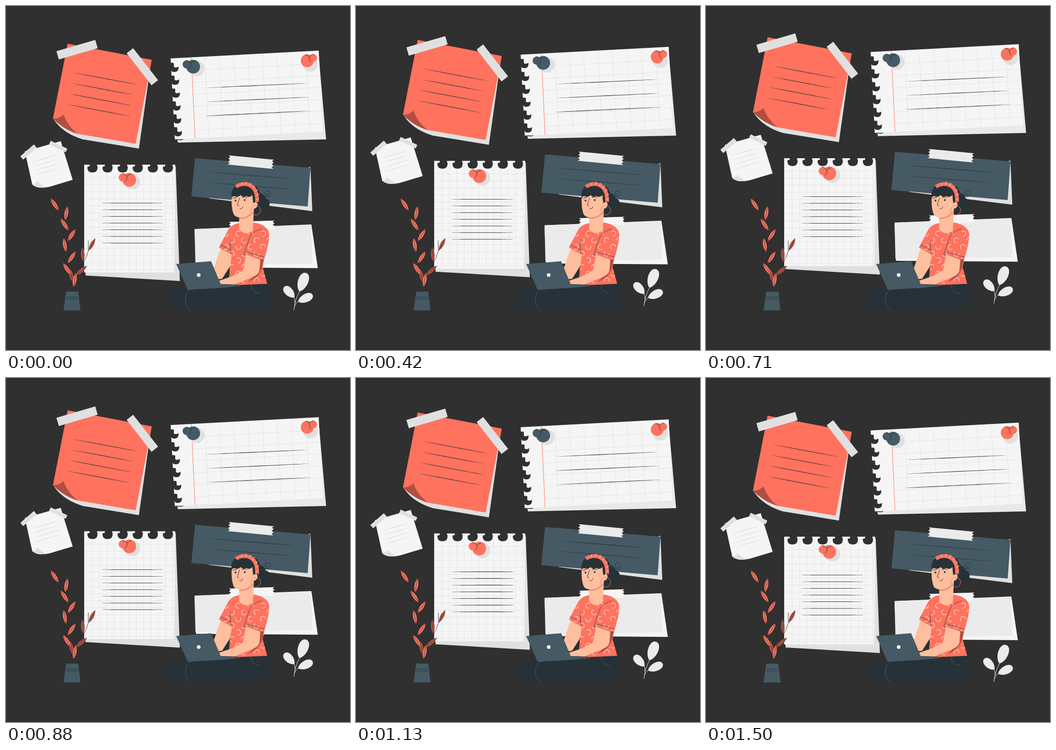
Recreate the animation shown at these times as an HTML page. Size 748 px wide and 748 px high, loop 1.54 s.

```html
<!DOCTYPE html>
<html lang="en">
<head>
<meta charset="utf-8">
<title>Notes</title>
<style>
  html, body { margin: 0; width: 100%; height: 100%; overflow: hidden; background: #303030; }
  svg { display: block; width: 100%; height: 100%; }
</style>
</head>
<body>
<svg id="stage" viewBox="0 0 748 748"></svg>
<script>
const BG = '#303030', CORAL = '#ff725e', RUST = '#b24f41', BLUE = '#455a64', INK = '#263238',
      PAPER = '#f5f5f5', PALE = '#ebebeb', GREY = '#e0e0e0', SKIN = '#ffbe9d';

const fill = (d, color) => `<path d="${d}" fill="${color}"/>`;
const disc = (x, y, r, color) => `<circle cx="${x}" cy="${y}" r="${r}" fill="${color}"/>`;
const ring = (x, y, r, color, extra = '') =>
  `<circle cx="${x}" cy="${y}" r="${r}" fill="none" stroke="${color}" ${extra}/>`;
const stroke = (d, color, width = 1) => `<path d="${d}" fill="none" stroke="${color}" stroke-width="${width}"/>`;
const place = (x, y, angle, content) => `<g transform="translate(${x} ${y}) rotate(${angle})">${content}</g>`;
const repeat = (n, make) => Array.from({ length: n }, (_, i) => make(i)).join('');

// A shape pointed at both ends; its sides bulge by w, fullest between the fractions t and 1 - t
function spindle(x1, y1, x2, y2, w, t, color) {
  const dx = x2 - x1, dy = y2 - y1, len = Math.hypot(dx, dy);
  const at = (f, side) => `${x1 + dx * f - side * w * dy / len} ${y1 + dy * f + side * w * dx / len}`;
  return fill(`M${x1} ${y1}C${at(t, 1)} ${at(1 - t, 1)} ${x2} ${y2}C${at(1 - t, -1)} ${at(t, -1)} ${x1} ${y1}`, color);
}
const rule = (x1, y1, x2, y2, color = INK) => spindle(x1, y1, x2, y2, .75, .08, color);
const leaf = (color, x1, y1, x2, y2) =>
  spindle(x1, y1, x2, y2, 5.4, .35, color) + stroke(`M${x1} ${y1}L${x2} ${y2}`, INK, .8);

const tape = (x, y, w, h, angle, color = GREY) =>
  place(x, y, angle, `<rect x="${-w / 2}" y="${-h / 2}" width="${w}" height="${h}" fill="${color}"/>`);

function tornTape(x, y, w, h, angle, color) {
  const edge = side => repeat(7, i => `${side * (w / 2 - (i % 2) * 4)},${side * h * (i / 6 - .5)} `);
  return place(x, y, angle, `<polygon points="${edge(1)}${edge(-1)}" fill="${color}"/>`);
}

// Push pin: big disc, small knob, and its shadow
function pin(x, y, r, dx, dy, knob, color, shadowX, shadowY) {
  const kx = x + dx, ky = y + dy, s = Math.sign(dx);
  return disc(x + shadowX, y + shadowY, r + 2, GREY) + disc(x, y, r, color) + disc(kx, ky, knob, color) +
    stroke(`M${kx + s} ${ky - knob}Q${kx - s * knob * 1.3} ${ky - 4} ${kx - s * knob} ${ky + 2}T${kx - s * 5} ${ky + 9}`, INK) +
    stroke(`M${kx - s * knob} ${ky - 3}q${-s * 4} -4 ${-s * 9} -4`, INK);
}

function coralNote() {
  return fill('M300 130L316 118 289 310 167 290Q124 277 104 247Z', GREY) +
    fill('M134 82L317 117 282 299.5 156 278Q127 268 102 245Z', CORAL) +
    fill('M102 245Q116 245 125 236Q133 260 156 278Q127 270 102 245', RUST) +
    repeat(4, i => rule(147 - 4.3 * i, 145 + 23 * i, 286 - 5 * i, 171 + 23 * i)) +
    tape(154.5, 95, 88, 18.8, -16.3) + tape(296.5, 132, 88, 18, 52);
}

function indexCard() {
  const grid = repeat(8, i => `M${432 + 31.4 * i} ${110 - 1.7 * i}l9 174`) +
               repeat(6, i => `M${405 + 1.3 * i} ${140 + 26 * i}l277 -15`);
  return fill('M679 97L696 290 374 297 368 270Z', '#e9e9e9') +
    fill('M358 114L680 97 689 273 367 290Z', PAPER) +
    stroke(grid, GREY, .8) + stroke('M403 112L411 288', CORAL) +
    repeat(6, i => fill(`M${357 + 1.5 * i} ${123.5 + 28 * i}h6q2 0 2 3v6q5 3 10 -1q1 12 -9 12q-8 0 -8 -8z`, BG)) +
    fill('M372 289q7 2 14 0q-3 4 -12 2z', BG) +
    repeat(3, i => rule(434, 178 + 30.5 * i, 655 + 5 * i, 168 + 30 * i)) +
    pin(407, 132, 15, -14, -5, 9, BLUE, 8, 4) + pin(655, 119, 14, 13, -6, 8.5, CORAL, 7, 8);
}

function smallNote() {
  return fill('M41 316L119 294 145 378 95 393Q68 399 57 388Z', PAPER) +
    fill('M57 388Q66 387 68 380Q76 390 89 394Q68 398 57 388', GREY) +
    repeat(4, i => rule(57 + 2.6 * i, 339 + 9.6 * i, 112 + 2.3 * i, 323 + 9.5 * i, '#d8d8d8')) +
    tape(49, 317.5, 39, 9.5, -41) + tape(113.5, 305.5, 40, 8.5, 25.5);
}

function gridNote() {
  const grid = repeat(12, i => `M${187 + 16 * i} 346V579`) + repeat(14, i => `M171 ${373 + 15.4 * i}H366`);
  return fill('M365 349H369L378 598 173 586V570Z', GREY) +
    fill('M170 345H368L366 579.5H170Z', PAPER) +
    stroke(grid, GREY, .8) +
    repeat(6, i => fill(`M${182 + 32.8 * i} 344h16q-1 3 1 5q1 13 -11 13q-11 0 -11 -11q0 -2 2 -2q4 1 3 -5z`, BG)) +
    repeat(7, i => rule(205, 428.5 + 14.5 * i, 344, 428.5 + 14.5 * i)) +
    pin(268, 378, 15, -14, -5, 9, CORAL, 7, 4);
}

function strips() {
  return fill('M655 352L662 350 666 446 440 418Z', GREY) +
    fill('M411 331L662 352 656 436 403 414Z', BLUE) +
    rule(442, 361, 624, 376) + rule(443, 384, 628, 399) +
    tornTape(532.5, 339.5, 99, 20, 5.5, PALE) +
    fill('M410 485L664 475 678 570 413 568Z', PAPER) +
    fill('M410 485L663 476 666 560 412 564Z', PALE) +
    rule(448, 508, 618, 504, GREY) +
    tornTape(534.5, 477, 99, 18, -1.8, PAPER);
}

function paleSprig() {
  const petal = (x, y, angle, length, w) =>
    place(x, y, angle, fill(`M0 0C${-w} ${-length * .25} ${-w} ${-length} 0 ${-length}S${w} ${-length * .25} 0 0`, PALE));
  return petal(638, 621, 20, 43, 15) + petal(627, 634, -43, 32, 12) + petal(635, 643, 65, 35, 12) +
    stroke('M626 661Q628 640 638 621M628 646Q629 637 625 631M627 654Q630 645 638 641', PALE);
}

// Leaves alternate along a wavy stem; every third one stands nearly upright
function plant() {
  const coralLeaf = i => {
    const x = 122 + 3.2 * i + (10 - 1.1 * i) * Math.cos((i - 2) * 1.2), y = 445 + 21 * i + .4 * i * i;
    const lean = (i % 2 ? 1 : -1) * (13.5 - 8 * Math.cos((i - 1) * Math.PI * 2 / 3));
    return leaf(CORAL, x, y, x + lean, y - Math.sqrt(32 ** 2 - lean ** 2));
  };
  return stroke('M179 510V532Q176 546 169 556L151 586', INK, .9) +
    leaf(RUST, 151, 586, 176, 565) + leaf(RUST, 145, 601, 139, 571) +
    leaf(RUST, 168, 557, 166, 524) + leaf(RUST, 180, 532, 194, 505) +
    repeat(8, coralLeaf) +
    fill('M131 621H157L162 662H125Z', BLUE) + stroke('M132 633H156M131 637H157', INK);
}

function shirt() {
  const outline = 'M507 472Q490 475 483 487L463 525 491 541 487 568 484 603 505 607 568 604 558 568 561 552Q574 510 572 494Q568 476 540 471Z';
  const arc = i => {
    const row = i >> 2, x = 478 + 27 * (i & 3) + (row % 2) * 13, y = 495 + 14.5 * row;
    return ring(x, y, 5.6, '#ffe3df', `stroke-width="1.2" stroke-dasharray="22 14" transform="rotate(${i * 77} ${x} ${y})"`);
  };
  return `<clipPath id="shirt"><path d="${outline}"/></clipPath>` + fill(outline, CORAL) +
    `<g clip-path="url(#shirt)">${repeat(32, arc)}</g>` +
    fill('M552 550L560 553 557 568Q550 592 525 600Q550 582 552 550', RUST) +
    stroke('M556 484Q535 491 530 503L517 541 560 553M519 534L562 546M466 519L489 531M487 508L489 539', INK, .8);
}

function head() {
  const tick = i => {
    const a = -1.9 + i * .36, x = Math.cos(a), y = Math.sin(a);
    return `M${520 + 24 * x} ${414 + 25 * y}L${522 + 29 * x} ${412 + 30 * y}`;
  };
  return fill('M540 390Q551 396 552 406Q564 411 564 418Q575 421 573 432Q571 448 556 446Q546 457 538 453Z', INK) +
    stroke('M556 413Q575 419 575 407Q574 401 568 402Q562 404 563 410Q567 414 570 408', INK) +
    fill('M507 450V486Q521 502 537 487L539 440Z', SKIN) +
    fill('M507 458Q526 460 539 445Q531 463 507 463Z', '#eb8b6a') +
    fill('M491 412Q489 438 495 453Q500 461 514 460Q530 458 539 441Q547 439 547 431Q546 424 538 427V408Z', SKIN) +
    fill('M491 419Q487 398 502 390Q524 383 538 392Q550 400 545 424L538 430Q536 421 536 411Q529 418 522 413Q516 418 510 411Q504 417 499 414Q492 412 491 419Z', INK) +
    stroke('M500 393Q508 387 520 387Q547 390 546 426', CORAL, 8) +
    stroke(repeat(7, tick), '#ffd2ca') +
    disc(542, 432, 5, SKIN) + ring(543, 444, 10.5, CORAL) +
    disc(499, 423, 1.9, INK) + disc(519, 422, 1.9, INK) +
    stroke('M494 419Q497 415 502 417M514 417Q518 413 524 417', INK, 1.2) +
    stroke('M508 417L503 432Q503 435 507 434M508 440Q513 443 515 436', INK);
}

function woman() {
  return fill('M372 614Q349 616 349 637Q349 661 374 661H550Q574 661 573 630L571 604 505 604 400 612Z', INK) +
    stroke('M406 616Q390 619 390 640Q391 656 402 661M533 606Q533 624 552 625', BLUE) +
    fill('M487 567L470 592 468 603 488 600Z', INK) +
    fill('M467 526L491 541 487 566 470 593 455 595 452 570Z', SKIN) +
    shirt() + head() +
    fill('M522 541L553 551 551 576Q549 584 535 590L496 606 466 605 461 598 491 588 515 575Z', SKIN) +
    fill('M370 561L446 555 467 605 506 606 508 609 467 613 395 617Z', BLUE) +
    stroke('M467 605L506 607', INK, .7) + disc(419, 585, 4, PAPER);
}

const stage = document.getElementById('stage');
stage.innerHTML = `<rect width="748" height="748" fill="${BG}"/>
  <g id="floating">${coralNote()}${indexCard()}${smallNote()}${gridNote()}${strips()}${paleSprig()}</g>
  ${plant()}${woman()}`;
const floating = document.getElementById('floating');

// 24 steps a second: steady rise, steady fall, back at rest on step 36
const LOOP = 1540, STEP = 1000 / 24, start = performance.now();
function draw() {
  const n = Math.floor(((performance.now() - start) % LOOP + 4.5) / STEP);
  const lift = Math.max(0, Math.min(n * .825, (36 - n) * .787));
  floating.setAttribute('transform', `translate(0 ${-lift})`);
  requestAnimationFrame(draw);
}
draw();
</script>
</body>
</html>
```
